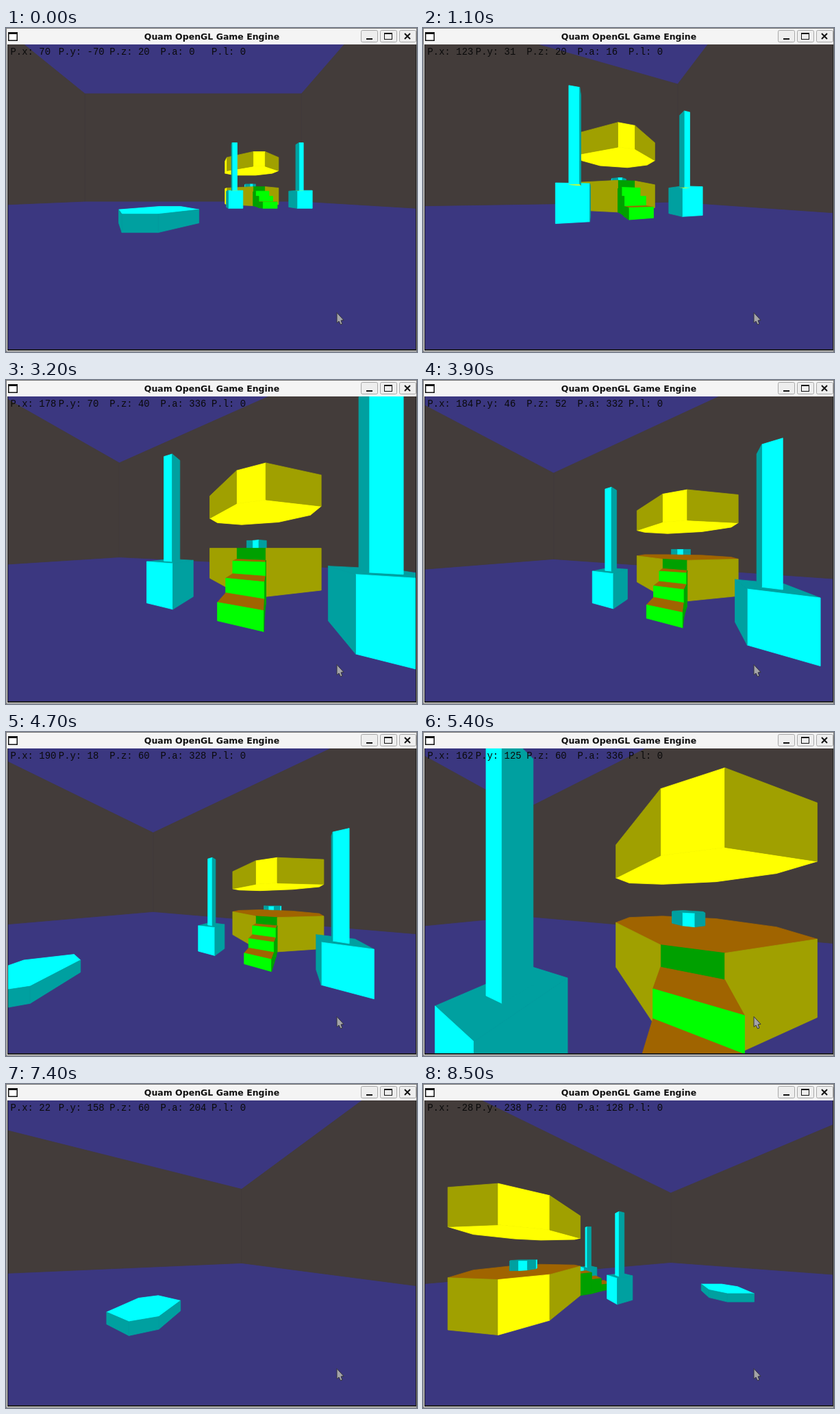
Write an HTML page with a canvas that moves like this. It is 600 by 473 pixels and loops after 8600 ms.

```html
<!DOCTYPE html>
<html lang="en">
<head>
<meta charset="utf-8">
<title>Quam OpenGL Game Engine</title>
<style>
  html, body { margin: 0; width: 100%; height: 100%; overflow: hidden; background: #f4f4f4; }
  canvas { display: block; }
</style>
</head>
<body>
<canvas id="stage" width="600" height="473"></canvas>
<script>
const ctx = document.getElementById('stage').getContext('2d');
const LOOP = 8600, STEP = 100;
const VIEW = { x: 3, y: 24, w: 595, h: 445 };
const CENTER = { x: 301.2, y: 245.6 };
const FOCAL = 200, PIXEL = VIEW.w / 640;

const BLUE = '#3b3780', GRAY = '#433c3a', BROWN = '#a06400';
const YELLOW = '#ffff00', OLIVE = '#a0a000';
const GREEN = '#00ff00', DARK_GREEN = '#00a000';
const CYAN = '#00ffff', TEAL = '#00a0a0';

// Footprints run counter-clockwise; wall colours repeat around them
const prism = (points, z1, z2, walls, top, bottom = top) => ({ points, z1, z2, walls, top, bottom });

const box = (x, y, size) => [[x, y], [x + size, y], [x + size, y + size], [x, y + size]];

// Rectangle with cut corners; the rear cuts may differ from the front ones
function octagon(x, y, w, h, frontX, frontY, rearX = frontX, rearY = frontY) {
  const half = [[frontX, 0], [w - frontX, 0], [w, frontY], [w, h - rearY], [w - rearX, h], [rearX, h], [0, h - rearY], [0, frontY]];
  return half.map(([dx, dy]) => [x + dx, y + dy]);
}

const room = prism(box(-400, -400, 800).reverse(), 0, 400, [GRAY]);
const deck = octagon(104, 184, 120, 104, 48, 40, 32, 32);
const sectors = [
  prism(octagon(0, 0, 60, 50, 20, 25), 0, 10, [TEAL], CYAN),
  prism(deck, 0, 40, deck.map((_, i) => i % 2 ? OLIVE : i ? YELLOW : DARK_GREEN), BROWN),
  prism(deck, 80, 110, [YELLOW, OLIVE], YELLOW),
  prism(octagon(152, 232, 24, 24, 8, 8), 40, 50, [CYAN, TEAL], TEAL)
];
for (let i = 0; i < 3; i++) {
  const y = 136 + 16 * i;
  const tread = [[152, y], [176, y], [176, y + 16], [152, y + 16]];
  sectors.push(prism(tread, 0, 10 + 10 * i, [GREEN, DARK_GREEN], BROWN));
}
for (const x of [96, 208]) {
  sectors.push(prism(box(x, 136, 24), 0, 30, [CYAN, TEAL], TEAL));
  sectors.push(prism(box(x + 8, 144, 8), 30, 110, [CYAN, TEAL], TEAL, YELLOW));
}

// Walk through the level; headings are clockwise degrees
const WALK = [
  { t: 0, x: 70, y: -70, a: 0 },
  { t: 1000, x: 118, y: 22, a: 16 },
  { t: 2000, x: 166, y: 115, a: 0 },
  { t: 3200, x: 178, y: 70, a: -24 },
  { t: 4700, x: 190, y: 18, a: -32 },
  { t: 5400, x: 162, y: 125, a: -24 },
  { t: 7400, x: 22, y: 158, a: -156 },
  { t: 8500, x: -28, y: 238, a: -232 }
];

function cameraAt(t) {
  const next = Math.max(1, WALK.findIndex(key => key.t >= t));
  const from = WALK[next - 1], to = WALK[next];
  const k = (t - from.t) / (to.t - from.t);
  const mix = (name, unit) => Math.round((from[name] + (to[name] - from[name]) * k) / unit) * unit;
  const rise = Math.min(1, Math.max(0, (t - 2000) / 2500));
  return { x: mix('x', 1), y: mix('y', 1), z: 20 + 4 * Math.round(10 * rise), a: mix('a', 4) };
}

function clipNear(points) {
  const out = [];
  points.forEach((p, i) => {
    const q = points[(i + 1) % points.length];
    if (p[1] >= 1) out.push(p);
    if ((p[1] >= 1) !== (q[1] >= 1)) {
      const s = (1 - p[1]) / (q[1] - p[1]);
      out.push(p.map((v, n) => v + s * (q[n] - v)));
    }
  });
  return out;
}

function shape(points, color, outline, width) {
  ctx.beginPath();
  points.forEach(([x, y]) => ctx.lineTo(x, y));
  ctx.closePath();
  ctx.fillStyle = color;
  ctx.fill();
  ctx.strokeStyle = outline;
  ctx.lineWidth = width;
  ctx.stroke();
}

// Projection lands on whole engine pixels
const project = ([x, y, z]) => [
  CENTER.x + PIXEL * Math.trunc(FOCAL * x / y),
  CENTER.y - PIXEL * Math.trunc(FOCAL * z / y)
];

function face(points, color) {
  const visible = clipNear(points);
  if (visible.length > 2) shape(visible.map(project), color, color, 0.8);
}

function drawPrism(s, cam) {
  const low = s.z1 - cam.z, high = s.z2 - cam.z;
  if (s !== room) {
    if (low > 0) face(s.flat.map(p => [...p, low]), s.bottom);
    if (high < 0) face(s.flat.map(p => [...p, high]), s.top);
  }
  s.flat.forEach((p, i) => {
    const q = s.flat[(i + 1) % s.flat.length];
    if (p[0] * q[1] - q[0] * p[1] < 0)
      face([[...p, low], [...q, low], [...q, high], [...p, high]], s.walls[i % s.walls.length]);
  });
}

function drawWorld(cam) {
  const sin = Math.sin(cam.a * Math.PI / 180), cos = Math.cos(cam.a * Math.PI / 180);
  // View coordinates are whole numbers, as in an integer engine
  for (const s of [room, ...sectors]) {
    s.flat = s.points.map(([px, py]) => {
      const x = px - cam.x, y = py - cam.y;
      return [Math.trunc(x * cos - y * sin), Math.trunc(y * cos + x * sin)];
    });
    s.distance = s.points.reduce((d, [x, y]) => d + Math.hypot(x - cam.x, y - cam.y), 0) / s.points.length;
  }
  ctx.save();
  ctx.beginPath();
  ctx.rect(VIEW.x, VIEW.y, VIEW.w, VIEW.h);
  ctx.clip();
  ctx.fillStyle = BLUE;
  ctx.fillRect(VIEW.x, VIEW.y, VIEW.w, VIEW.h);
  drawPrism(room, cam);
  [...sectors].sort((a, b) => b.distance - a.distance).forEach(s => drawPrism(s, cam));
  ctx.restore();
}

function drawStatus(cam) {
  ctx.font = '13.95px "Liberation Mono", monospace';
  ctx.textAlign = 'left';
  ctx.fillStyle = '#0a0a0a';
  const values = { x: cam.x, y: cam.y, z: cam.z, a: (cam.a + 360) % 360, l: 0 };
  Object.entries(values).forEach(([name, value], i) =>
    ctx.fillText(`P.${name}: ${value}`, Math.max(6.5, 2.4 + 80 * PIXEL * i), 38.5));
}

function drawWindow() {
  ctx.fillStyle = '#777';
  ctx.fillRect(0, 0, 600, 473);
  ctx.fillStyle = '#f4f4f4';
  ctx.fillRect(1, 1, 598, 471);
  ctx.fillStyle = '#222';
  ctx.fillRect(2, 24, 597, 447);

  ctx.fillStyle = '#111';
  ctx.fillRect(3, 6, 14, 13);
  ctx.fillStyle = '#fff';
  ctx.fillRect(4.5, 9, 11, 8.5);
  ctx.font = 'bold 12.5px "DejaVu Sans", sans-serif';
  ctx.textAlign = 'center';
  ctx.fillStyle = '#111';
  ctx.fillText('Quam OpenGL Game Engine', 300.5, 17);

  for (let i = 0; i < 3; i++) {
    ctx.beginPath();
    ctx.roundRect(518.5 + 28 * i, 3.5, 24, 17, 2);
    ctx.fillStyle = '#eee';
    ctx.fill();
    ctx.strokeStyle = '#a8a8a8';
    ctx.lineWidth = 1;
    ctx.stroke();
  }
  ctx.fillStyle = ctx.strokeStyle = '#111';
  ctx.fillRect(526, 15, 9, 2);
  ctx.fillRect(552, 7, 12, 2);
  ctx.strokeRect(552.5, 7.5, 11, 9);
  ctx.lineWidth = 2;
  ctx.beginPath();
  ctx.moveTo(582, 8); ctx.lineTo(590, 16);
  ctx.moveTo(590, 8); ctx.lineTo(582, 16);
  ctx.stroke();
}

function drawPointer() {
  const outline = [[0, 0], [0, 15], [3, 12.5], [5.5, 17.5], [8, 16.5], [6, 11.5], [10, 11]];
  shape(outline.map(([x, y]) => [483 + x, 415.5 + y]), '#a4a4a8', '#34343c', 1);
}

function render(now) {
  const cam = cameraAt(Math.floor((now % LOOP) / STEP) * STEP);
  drawWindow();
  drawWorld(cam);
  drawStatus(cam);
  drawPointer();
  requestAnimationFrame(render);
}
requestAnimationFrame(render);
</script>
</body>
</html>
```
